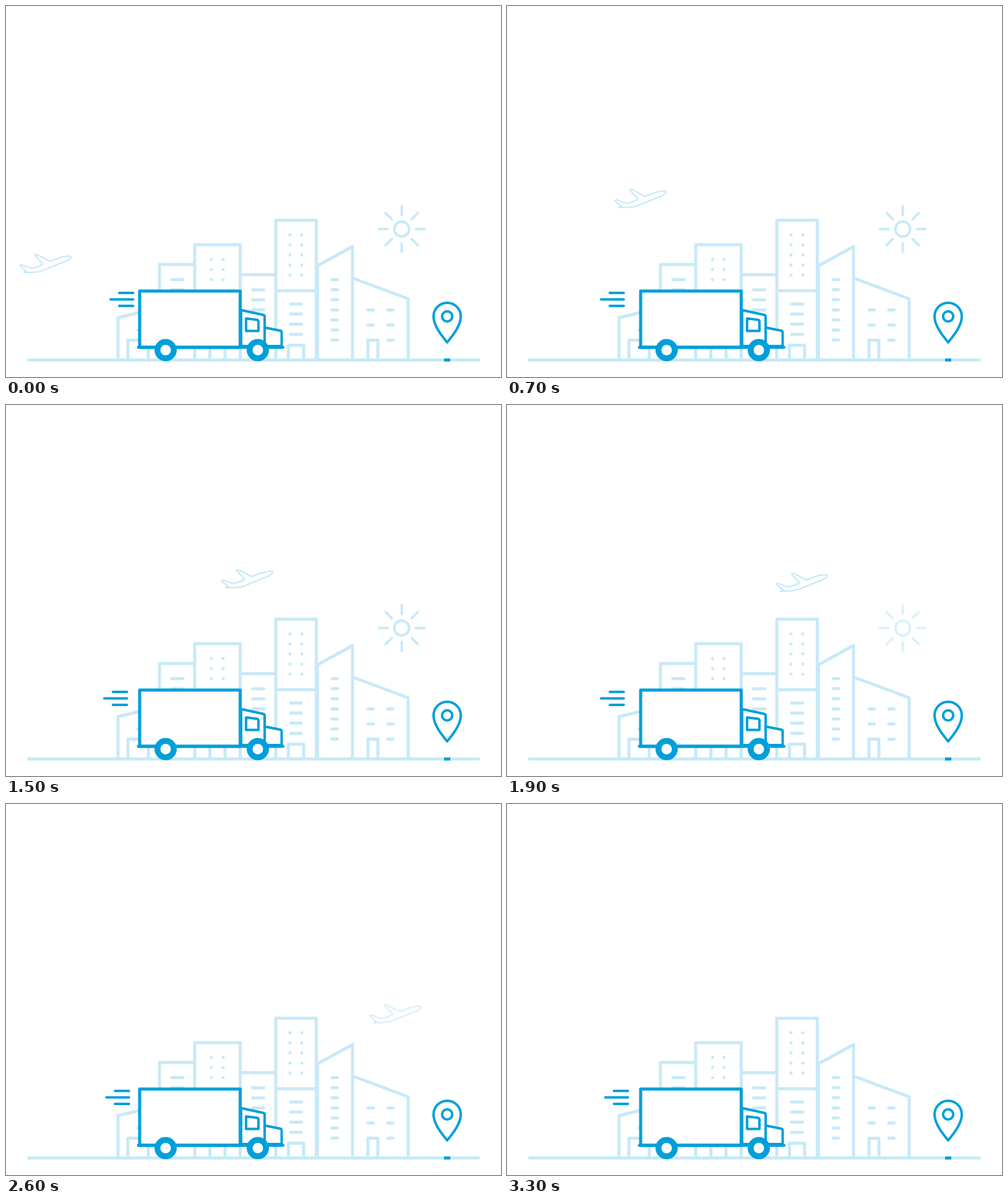
Write an HTML page that moves like this. It is 800 px wide and 600 px high and loops after 3.4 s.

```html
<!DOCTYPE html>
<html lang="en">
<head>
<meta charset="utf-8">
<title>Delivery truck</title>
<style>
  html, body { margin: 0; width: 100%; height: 100%; overflow: hidden; background: #fff; }
  svg { display: block; width: 800px; height: 600px; }
  .line { fill: none; stroke-linecap: round; stroke-linejoin: round; }
  .pale { stroke: #c8e9f7; }
  .blue { stroke: #009fda; }
  .solid { fill: #fff; }
</style>
</head>
<body>
<svg viewBox="0 0 800 600">
  <g class="line pale" stroke-width="5">
    <path d="M181 570V504L214 496M197 570V540.5H230V570M248 570V418H303
      M305 570V386H378.5V570M329.5 570V550M354 570V550M380 434.5H435
      M436 570V346.5H501.5V570M436 460.5H501.5M456.5 570V548.5H481V570
      M503.5 570V420L560 389V570M560 440L650 473.5V570M585 570V540.5H601V570"/>
    <path id="windows"/>
    <path d="M36.5 572.5H763.5"/>
  </g>
  <path d="M708 570h10v5h-10z" fill="#009fda"/>

  <g id="sun" class="line pale" stroke-width="4">
    <circle cx="639.5" cy="360.8" r="12"/>
    <path id="rays"/>
  </g>

  <path id="plane" class="line pale" stroke-width="2.3" d="M22.5 420Q22 419 25.5 418.3Q36 423.5 43 424
    Q50 422.500 60 417.500L47 403.500Q46.500 401 50 402L71 413L87 406.800Q101 403 104.500 405
    Q107 407.500 97 412.500L60 427.500Q52 431 33 431L29 431Q28.500 429.500 33.500 429.500Z"/>

  <path id="speed" class="line blue" stroke-width="4" d="M183 464H205.5M169 474.500H205.5M183 485H205.5"/>

  <g class="line blue" stroke-width="4">
    <path class="solid" d="M380 491.700L415.500 499.500Q418 500 418 502.500V550H380Z"/>
    <path class="solid" d="M418 520L443 525Q445.500 525.500 445.500 528V550H418Z"/>
    <path d="M388 505.300L405.500 507.500Q408 508 408 510.500V525.500H388Z"/>
    <path class="solid" stroke-width="5" d="M216 552V461H378.500V552Z"/>
    <path stroke-width="5" d="M214 552H447.500"/>
    <g class="solid" stroke-width="9.500">
      <circle cx="258" cy="556.500" r="13.250"/>
      <circle cx="407" cy="556.500" r="13.250"/>
    </g>
    <path d="M713 544C704 533 691 517 691 502A22 22 0 0 1 735 502C735 517 722 533 713 544Z"/>
    <circle cx="713" cy="502" r="8.200"/>
  </g>
</svg>
<script>
  const el = id => document.getElementById(id);
  const clamp = v => Math.max(0, Math.min(1, v));

  // A column of evenly spaced dashes; zero length gives dots.
  const column = (x, y, length, count, gap = 16.3) =>
    Array.from({ length: count }, (_, i) => `M${x} ${y + i * gap}h${length}`).join('');

  el('windows').setAttribute('d', [
    column(213.5, 524, 10, 1),
    column(268, 442.5, 18, 2),
    column(332, 410, 0, 3), column(351, 410, 0, 3),
    column(398.5, 459, 18, 3),
    column(459, 370, 0, 5), column(478, 370, 0, 5),
    column(460, 482, 17.5, 4),
    column(527, 442.5, 8.5, 7),
    column(585, 491.5, 8.5, 3, 24.5), column(617, 491.5, 8.5, 3, 24.5)
  ].join(''));

  el('rays').setAttribute('d', Array.from({ length: 8 }, (_, i) => {
    const a = i * Math.PI / 4;
    const point = r => `${639.5 + r * Math.cos(a)} ${360.8 + r * Math.sin(a)}`;
    return `M${point(22.7)}L${point(36.7)}`;
  }).join(''));

  function draw() {
    // The motion advances ten times a second.
    const t = Math.floor(performance.now() % 3400 / 100) / 10;
    const x = 217.4 * t;
    const y = t * (-182.5 + (t - .4) * (94.5 + (t - 1.1) * (-23 + (t - 1.9) * 9)));
    el('plane').setAttribute('transform', `translate(${x} ${y})`);
    el('plane').setAttribute('opacity', clamp((2.95 - t) / .5));
    el('sun').setAttribute('opacity', clamp(2.5 - t));

    const phase = t % 1.2;
    const shift = 33.7 * Math.min(phase, 1.2 - phase);
    el('speed').setAttribute('transform', `translate(${-shift} 0)`);
    requestAnimationFrame(draw);
  }
  draw();
</script>
</body>
</html>
```
